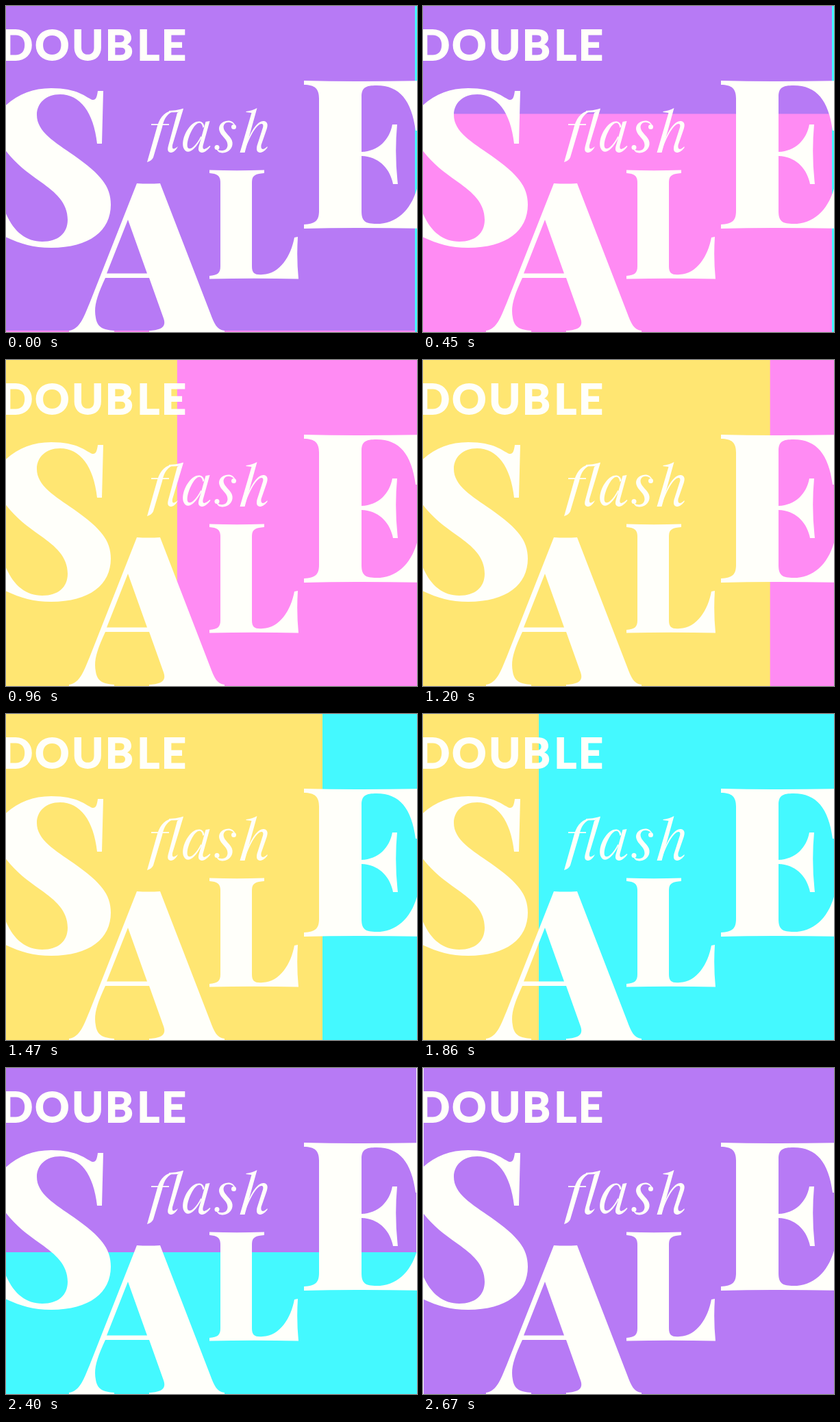
Animation, 600 px wide and 476 px high, one loop 2.84 s. Source, as an HTML page:

```html
<!DOCTYPE html>
<html lang="en">
<head>
<meta charset="utf-8">
<title>Double flash sale</title>
<style>
  html, body { margin: 0; width: 100%; height: 100%; overflow: hidden; }
  :root { --purple: #b77af5; --white: #fffffa; }
  .stage {
    position: relative; width: 600px; height: 476px;
    overflow: hidden; background: var(--purple);
  }
  .stage > * { position: absolute; top: 0; left: 0; }

  /* Panels are oversized so that a wipe may run past the stage edge.
     Times are multiples of 30 ms in a loop of 2840 ms. */
  .panel { width: 640px; height: 520px; }
  .panel, .edge { animation: 2840ms step-end -1ms infinite; }
  .pink { background: #ff8bf3; animation-name: rise; }
  .stage > .yellow { background: #ffe672; left: -640px; animation-name: right; }
  .cyan { background: #44f9ff; animation-name: left; }
  .stage > .purple {
    top: -520px; width: 599px; background: var(--purple);
    border-right: 1px solid var(--white); animation-name: drop;
  }
  .edge { height: 476px; }
  .stage > .first { left: 597px; width: 3px; background: #44f9ff; animation-name: first; }
  .last {
    width: 599px; background: var(--purple);
    border-left: 1px solid var(--white); animation-name: last;
  }

  @keyframes rise {
    0% { transform: translateY(474px); animation-timing-function: steps(23); }
    24.2958%, 100% { transform: translateY(-11.3px); }
  }
  @keyframes right {
    0% { transform: translateX(-7px); }
    25.3521% { transform: translateX(-7px); animation-timing-function: steps(19); }
    45.4225%, 100% { transform: translateX(603px); }
  }
  @keyframes left {
    0% { transform: translateX(620px); }
    44.3662% { transform: translateX(619.8px); animation-timing-function: steps(28); }
    73.9437%, 100% { transform: translateX(-11.3px); }
  }
  @keyframes drop {
    0% { transform: translateY(-24px); }
    71.831% { transform: translateY(-23.6px); animation-timing-function: steps(21); }
    94.0141%, 100% { transform: translateY(488.8px); }
  }
  @keyframes first {
    0% { opacity: 1; }
    24.2958%, 100% { opacity: 0; }
  }
  @keyframes last {
    0% { opacity: 0; }
    94.0141%, 100% { opacity: 1; }
  }

  svg { display: block; fill: var(--white); }
  text {
    font: 700 62px Lato, "Open Sans", sans-serif;
    stroke: var(--white); stroke-width: 2;
  }
</style>
</head>
<body>
<div class="stage">
  <div class="panel pink"></div>
  <div class="edge first"></div>
  <div class="panel yellow"></div>
  <div class="panel cyan"></div>
  <div class="panel purple"></div>
  <div class="edge last"></div>

  <svg width="600" height="476" viewBox="0 0 600 476">
    <text x="-8 42.2 96.200 145 191.500 227" y="79">DOUBLE</text>

    <g role="img" aria-label="flash">
      <path d="M206 228L221 175C226 159 235 152 247 153C236 156 231 163 228 177L215 221Q213 226 206 228Z"/>
      <path d="M212 172.300H238V174H212ZM238 153Q250 153 259 149.500L256 154Q248 156 238 155Z"/>
      <path d="M259 150L243 203C242 210 245 210 251 205C247 213 243 214 240 214C235 213 236 208 237 204L250 156Z"/>
      <g transform="translate(-1.500 0)">
        <path d="M291 176C290 168 282 166 274 172C263 181 257 199 261 208C265 217 276 214 287 192L286 190C278 206 270 211 267 207C264 201 270 184 277 175C283 168 288 170 289 178Z"/>
        <path d="M293 169L299 168L289 204C288 210 291 211 299 204L300 205C294 213 290 214 287 214C282 213 282 209 283 205Z"/>
        <path d="M336 174C334 170 331 167.500 326 167.500C316 168 311 175 313 182C315 190 325 194 325 203C325 210 318 214 309 209C311 214 315 214.500 318 214.500C327 214 333 207 332 199C331 190 319 185 319 177C319 170 327 167 334 173Z"/>
        <circle cx="309.500" cy="206.500" r="3.500"/>
        <circle cx="334" cy="176.500" r="3.500"/>
        <path d="M352 154Q361 153 368 149L350 214H343L360 156L352 155Z"/>
        <path d="M352 203C360 178 371 167 378 168C384 169 384 174 382 180L374 203C373 210 377 211 383 205V207C378 213 375 214 372 214C367 213 367 209 368 204L376 179C379 171 374 170 369 175C362 182 357 193 351 208Z"/>
      </g>
    </g>

    <g role="img" aria-label="SALE" fill-rule="evenodd">
      <path d="M-10 155C10 132 35 120 66 120C105 120 116 133 126 137C132 138 133 131 134 124H142L140 201H133C128 155 108 129 79 129C58 129 45 142 45 159C45 184 72 199 99 218C136 244 153 262 153 290C153 328 122 353 66 353C35 353 18 346-10 333V270C0 320 22 344 53 344C76 344 90 332 90 312C90 287 72 272 51 257C27 240 10 228-10 198Z"/>
      <path d="M191 259Q208 260 225 259L298 448C304 464 308 473 319 474V477H209V474C224 473 235 470 230 456L209 397H145C132 425 128 440 131 455C133 469 142 473 158 474V477H92V474C108 472 114 453 122 434ZM178 312L147 390.500H206Z"/>
      <path d="M297 239.500Q337 241 377 239.500V244C364 245 359 247 359 258V380C359 391 364 393 375 392C400 391 416 365 421 338L426 337Q424 368 427 398.500Q362 397 297 398.500V394C309 393 313 390 313 380V258C313 248 309 245 297 244Z"/>
      <path d="M435 109Q520 111 610 109V182H598C592 138 575 116 541 116C525 116 519 119 519 133V213C544 212 560 195 564 173H571Q567 216 572 260H565C561 238 545 220 519 219V299C519 315 525 318 541 318C570 318 592 298 601 263H610V325Q520 323 435 325V319C452 318 457 313 457 299V135C457 121 451 115 435 115Z"/>
    </g>
  </svg>
</div>
</body>
</html>
```
